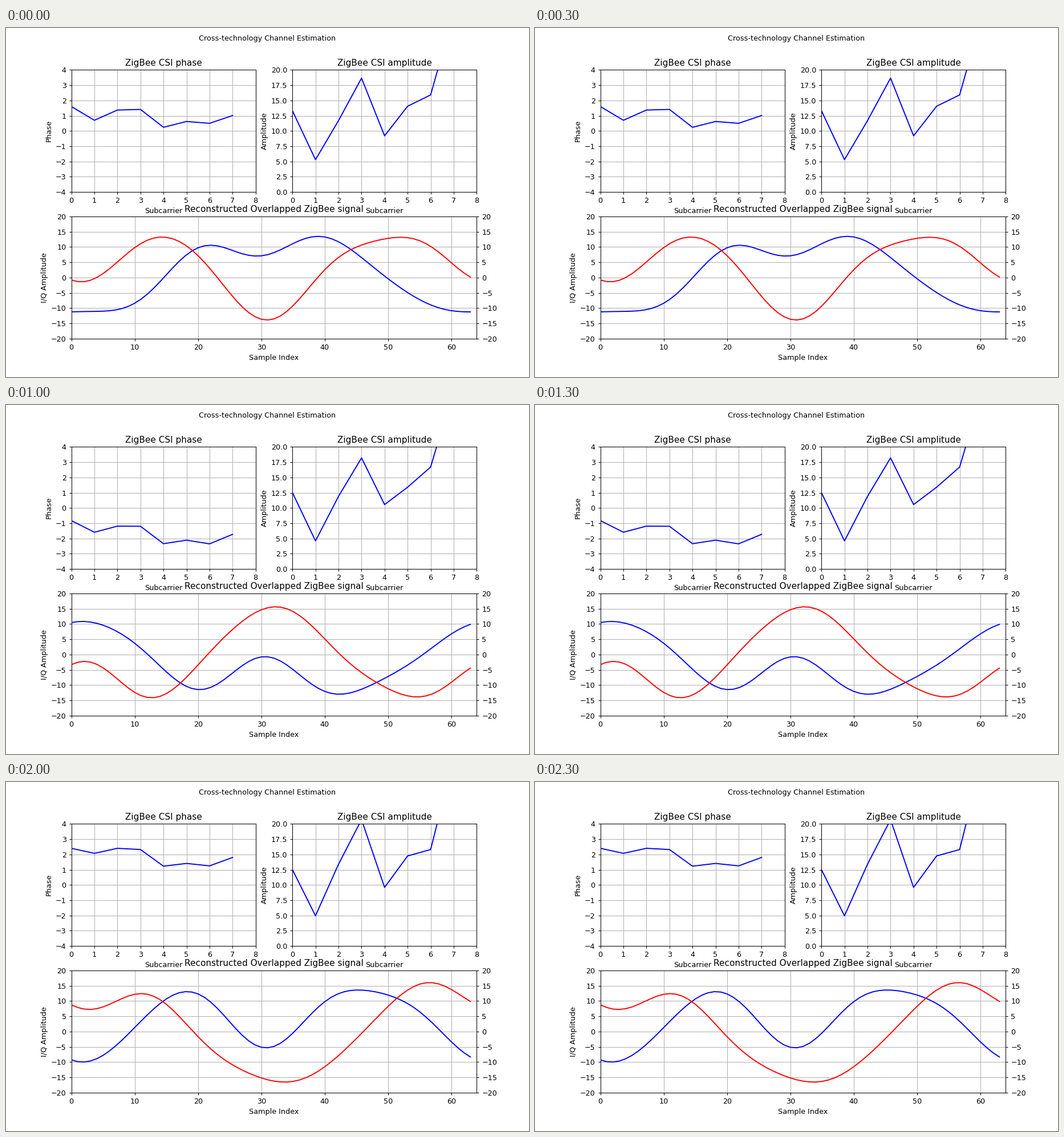
Animation of 917x611 px, one loop 2.5 s. Source, as a matplotlib script:

```python
import numpy as np
import matplotlib.pyplot as plt
from matplotlib.animation import FuncAnimation

# Scale the default style a little so that it fits a 917 x 611 px stage.
SCALE = 0.917
SIZES = ["font.size", "lines.linewidth", "axes.linewidth", "grid.linewidth",
         "axes.labelpad", "axes.titlepad"]
SIZES += [f"{a}tick.major.{p}" for a in "xy" for p in ("size", "width", "pad")]
for key in SIZES:
    plt.rcParams[key] *= SCALE
plt.rcParams["font.family"] = "DejaVu Sans"

# One row per packet, one value per subcarrier.
PHASE = [
    [1.60, 0.70, 1.37, 1.41, 0.24, 0.62, 0.50, 1.01],
    [1.99, 1.26, 1.92, 1.83, 0.72, 0.95, 0.78, 1.27],
    [-0.83, -1.59, -1.19, -1.20, -2.34, -2.11, -2.35, -1.73],
    [0.38, -0.19, -0.11, -0.34, -1.62, -1.97, -2.51, -2.00],
    [2.40, 2.07, 2.40, 2.32, 1.23, 1.41, 1.25, 1.80],
]
AMPLITUDE = [
    [13.3, 5.3, 11.7, 18.65, 9.2, 14.05, 15.9, 29.3],
    [12.6, 6.2, 12.8, 19.5, 10.0, 14.9, 16.4, 30.4],
    [12.5, 4.6, 11.9, 18.2, 10.55, 13.4, 16.7, 29.5],
    [13.8, 7.45, 13.8, 20.0, 12.3, 14.15, 21.6, 30.0],
    [12.5, 4.95, 13.4, 20.7, 9.6, 14.75, 15.8, 30.8],
]

# Known samples of the I and Q parts, at the indices in KNOTS.
KNOTS = np.append(np.arange(0, 61, 5), 63)
I_PART = [
    [-11.1, -11.0, -8.5, 1.0, 9.7, 9.2, 7.15, 11.1, 13.25, 8.0, -0.6, -7.0, -11.1, -11.25],
    [-11.2, -10.4, -4.7, 5.9, 12.8, 8.0, 1.6, 6.1, 13.4, 12.2, 5.9, -1.9, -8.7, -10.9],
    [10.5, 9.6, 3.6, -5.5, -11.7, -6.6, -0.9, -4.9, -12.0, -12.1, -7.1, -0.8, 6.7, 9.9],
    [6.7, 12.7, 4.6, -7.9, -15.3, -10.8, 3.8, 9.0, -1.2, -11.2, -14.9, -14.9, -5.3, 3.9],
    [-9.3, -7.8, 1.3, 10.7, 12.3, 3.2, -5.2, -0.4, 9.7, 13.65, 11.9, 6.5, -3.4, -8.3],
]
Q_PART = [
    [-0.8, 1.3, 9.8, 13.15, 7.2, -5.1, -13.6, -9.3, 2.6, 9.9, 12.9, 12.0, 4.9, 0.1],
    [3.6, 4.3, 11.7, 13.0, 5.0, -6.6, -15.6, -14.7, -5.1, 5.0, 12.3, 15.4, 9.9, 4.8],
    [-3.3, -4.4, -12.3, -12.9, -3.3, 7.3, 14.7, 14.1, 5.1, -4.6, -11.2, -13.85, -9.1, -4.4],
    [-6.2, -2.2, -10.8, -15.4, -4.0, 8.3, 12.9, 16.0, 16.2, 9.9, 0.5, -9.2, -11.7, -7.9],
    [8.8, 8.0, 12.2, 9.0, -1.8, -10.2, -15.3, -16.3, -11.5, -2.4, 8.3, 15.5, 13.7, 9.9],
]

SAMPLES = np.arange(64)
HARMONICS = np.arange(-4, 5)


def basis(n):
    return np.exp(2j * np.pi * np.outer(n, HARMONICS) / 64)


def reconstruct(i_part, q_part):
    """Band-limited periodic signal through the known samples."""
    known = np.array(i_part) + 1j * np.array(q_part)
    coeffs = np.linalg.lstsq(basis(KNOTS), known, rcond=None)[0]
    return basis(SAMPLES) @ coeffs


SIGNALS = [reconstruct(i, q) for i, q in zip(I_PART, Q_PART)]


def setup(pos, title, xlabel, ylabel, xticks, xmax, yticks):
    ax = fig.add_subplot(pos)
    ax.set_title(title)
    ax.set_xlabel(xlabel)
    ax.set_ylabel(ylabel)
    ax.set_xticks(xticks)
    ax.set_yticks(yticks)
    ax.set_xlim(0, xmax)
    ax.set_ylim(yticks[0], yticks[-1])
    ax.grid(True)
    return ax


fig = plt.figure(figsize=(9.17, 6.11), dpi=100)
fig.subplots_adjust(left=0.125, right=0.9, bottom=0.11, top=0.88,
                    wspace=0.2, hspace=0.2)
fig.suptitle("Cross-technology Channel Estimation", fontsize="medium")

phase_ax = setup(221, "ZigBee CSI phase", "Subcarrier", "Phase",
                 range(9), 8, range(-4, 5))
amp_ax = setup(222, "ZigBee CSI amplitude", "Subcarrier", "Amplitude",
               range(9), 8, np.arange(0, 20.1, 2.5))
signal_ax = setup(212, "Reconstructed Overlapped ZigBee signal",
                  "Sample Index", "I/Q Amplitude",
                  range(0, 61, 10), 64, range(-20, 21, 5))
signal_ax.tick_params(axis="y", right=True, labelright=True)

carriers = range(8)
phase_line, = phase_ax.plot(carriers, PHASE[0], "b")
amp_line, = amp_ax.plot(carriers, AMPLITUDE[0], "b")
i_line, = signal_ax.plot(SAMPLES, SIGNALS[0].real, "b")
q_line, = signal_ax.plot(SAMPLES, SIGNALS[0].imag, "r")


def update(k):
    phase_line.set_ydata(PHASE[k])
    amp_line.set_ydata(AMPLITUDE[k])
    i_line.set_ydata(SIGNALS[k].real)
    q_line.set_ydata(SIGNALS[k].imag)
    return phase_line, amp_line, i_line, q_line


anim = FuncAnimation(fig, update, frames=len(PHASE), interval=500,
                     repeat=True, repeat_delay=0)
plt.show()
```
